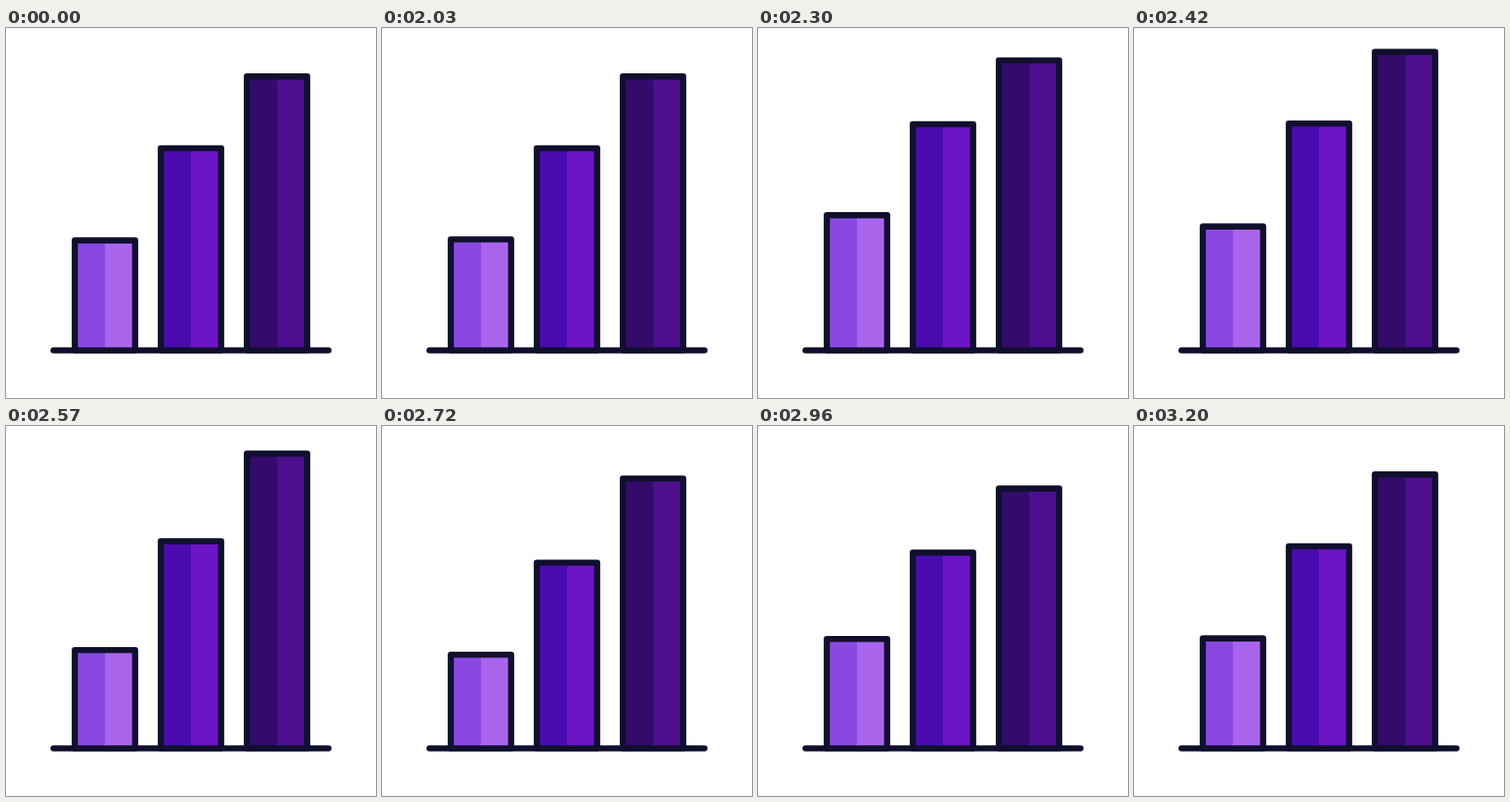
An HTML page that plays this animation: 400x400 px, repeating every 3230 ms.

```html
<!DOCTYPE html>
<html lang="en">
<head>
<meta charset="utf-8">
<title>Bar chart</title>
<style>
  html, body { margin: 0; height: 100%; overflow: hidden; background: #fff; }
  svg { display: block; width: 100%; height: 100%; }
  .ink { fill: none; stroke: #10102e; stroke-width: 6.6; stroke-linecap: round; stroke-linejoin: round; }
</style>
</head>
<body>
<svg viewBox="0 0 400 400"><path class="ink" d="M51.4 348.5H348.6"/></svg>
<script>
const LOOP = 3230, BASE = 348.5, WIDTH = 65.2;
const PEAK = -27.3, DIP = 19.1;
const svg = document.querySelector('svg');

function add(tag, attrs) {
  const el = document.createElementNS('http://www.w3.org/2000/svg', tag);
  for (const key in attrs) el.setAttribute(key, attrs[key]);
  return svg.appendChild(el);
}

const bars = [
  { x: 74.4, top: 229.6, start: 2000, colors: ['#8a48e3', '#a964ec'] },
  { x: 167.4, top: 130, start: 2100, colors: ['#4b0bae', '#6b14c5'] },
  { x: 260.4, top: 52.4, start: 2200, colors: ['#340a6c', '#4d0f8d'] }
];
for (const bar of bars) {
  bar.parts = bar.colors.map((fill, i) =>
    add('rect', { x: bar.x + i * WIDTH / 2, width: WIDTH / 2, fill, 'shape-rendering': 'crispEdges' }));
  bar.parts.push(add('rect', { x: bar.x, width: WIDTH, class: 'ink' }));
}

const sine = p => (1 - Math.cos(Math.PI * p)) / 2;

// cubic-bezier(.37, 0, .06, 1), solved by bisection
function snap(p) {
  let lo = 0, hi = 1;
  for (let i = 0; i < 24; i++) {
    const u = (lo + hi) / 2, v = 1 - u;
    if (3 * u * v * (0.37 * v + 0.06 * u) + u ** 3 < p) lo = u; else hi = u;
  }
  return lo * lo * (3 - 2 * lo);
}

// Jump up, sink below the resting height, settle
function offset(t) {
  if (t <= 0 || t >= 1000) return 0;
  if (t < 295) return PEAK * snap(t / 295);
  if (t < 660) return PEAK + (DIP - PEAK) * sine((t - 295) / 365);
  return DIP * (1 - sine((t - 660) / 340));
}

function draw(now) {
  const t = now % LOOP;
  for (const { top, start, parts } of bars) {
    const y = top + offset(t - start);
    for (const part of parts) {
      part.setAttribute('y', y);
      part.setAttribute('height', BASE - y);
    }
  }
}

const begin = performance.now();
function tick() {
  draw(performance.now() - begin);
  requestAnimationFrame(tick);
}
tick();
</script>
</body>
</html>
```
